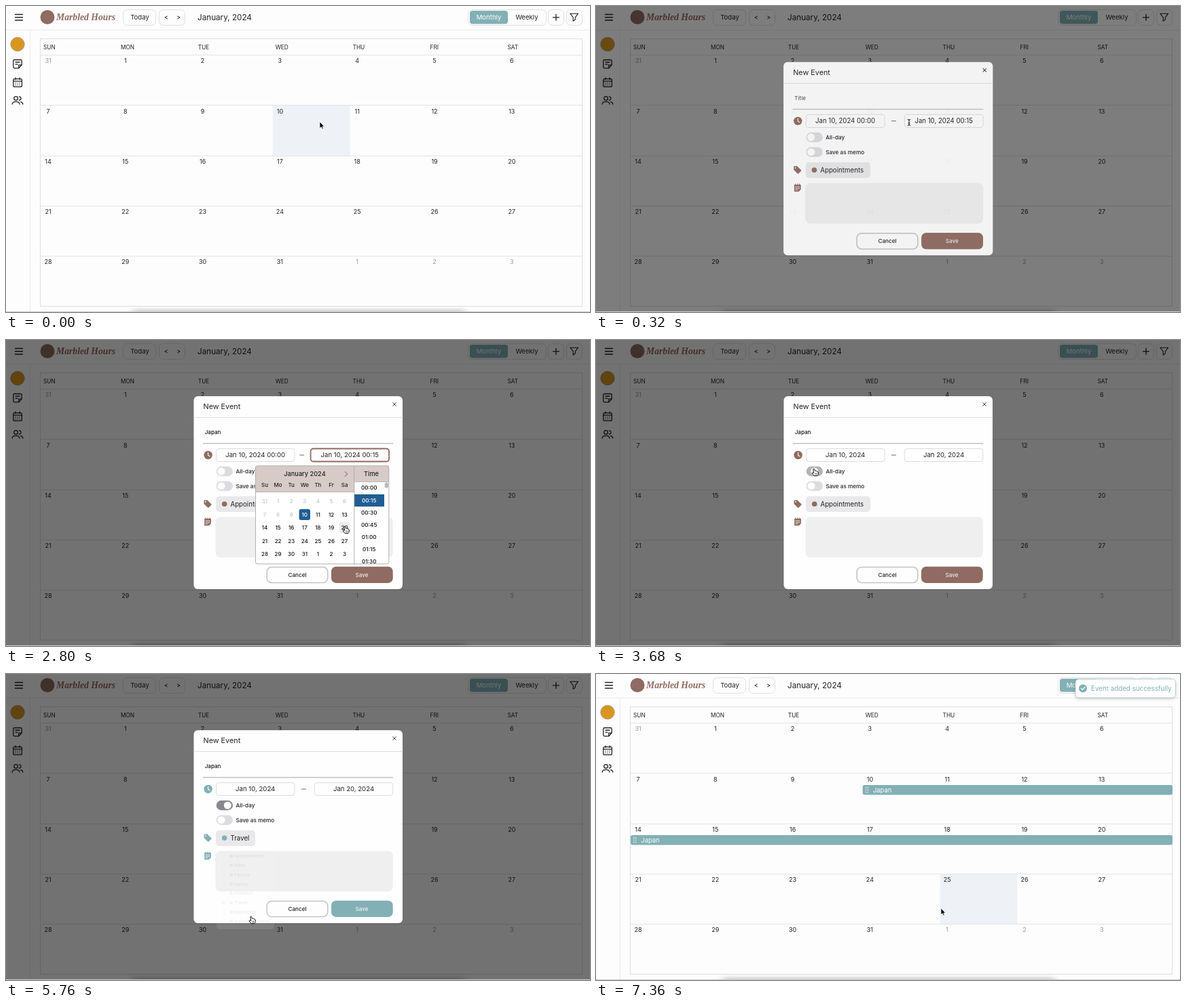
An HTML page that plays this animation: 860 px wide and 452 px high, repeating every 7440 ms.

```html
<!DOCTYPE html>
<html lang="en">
<head>
<meta charset="utf-8">
<title>Calendar event demo</title>
<style>
  html, body { margin: 0; width: 100%; height: 100%; overflow: hidden; background: #fdfdfd; }
  svg { display: block; width: 860px; height: 452px; font-family: Inter, "Open Sans", sans-serif; }
  text { white-space: pre; }
</style>
</head>
<body>
<svg id="stage" viewBox="0 0 860 452"></svg>
<script>
const LOOP = 7440, STEP = 80;
const TEAL = '#82b0b5', BROWN = '#8f6b62', INK = '#222', BLUE = '#1f5d93';
const DIM = .55;

// ---------- markup helpers ----------
const rect = (x, y, w, h, r, fill, extra = '') =>
  `<rect x="${x}" y="${y}" width="${w}" height="${h}" rx="${r}" fill="${fill}" ${extra}/>`;
const frame = (x, y, w, h, r, stroke, width = 1, extra = '') =>
  rect(x, y, w, h, r, 'none', `stroke="${stroke}" stroke-width="${width}" ${extra}`);
const dot = (x, y, r, fill, extra = '') => `<circle cx="${x}" cy="${y}" r="${r}" fill="${fill}" ${extra}/>`;
const path = (d, stroke, width = 1, extra = '') =>
  `<path d="${d}" fill="none" stroke="${stroke}" stroke-width="${width}" stroke-linecap="round" stroke-linejoin="round" ${extra}/>`;
// y is the vertical middle of the capitals
const text = (x, y, str, size, { fill = INK, mid = false, weight = 400, extra = '' } = {}) =>
  `<text x="${x}" y="${(y + size * 0.36).toFixed(2)}" font-size="${size}" fill="${fill}" font-weight="${weight}" ${mid ? 'text-anchor="middle"' : ''} ${extra}>${str}</text>`;
const group = (id, body, extra = '') => `<g id="${id}" ${extra}>${body}</g>`;
const range = n => [...Array(n).keys()];

// ---------- calendar page ----------
const colX = i => 51 + i * 113.9;
const rowY = i => Math.round(72 + i * 74.3) + .5;

function cells() {
  const names = ['SUN', 'MON', 'TUE', 'WED', 'THU', 'FRI', 'SAT'];
  const days = range(35).map(i => {
    const inMonth = i > 0 && i < 32;
    return text(62 + (i % 7) * 113.8, 81.2 + Math.floor(i / 7) * 74.25, (i + 30) % 31 + 1, 9,
      { mid: true, fill: inMonth ? INK : '#999' });
  });
  const lines = range(5).map(i => path(`M51 ${rowY(i)}H848`, '#e4e4e4'));
  return names.map((n, i) => text(55 + i * 113.9, 61, n, 8.3)).join('') +
    lines.join('') + frame(50.5, 48.5, 798, 395, 0, '#dedede') + days.join('');
}

function topBar() {
  const btn = (x, w) => frame(x + .5, 5.5, w, 23, 6, '#e0e0e0');
  return path('M0 35.5H860M35.5 36V452', '#ececec') +
    path('M13.5 12.5H24.5M13.5 16.8H24.5M13.5 21H24.5', INK, 1.4) +
    dot(61, 16.5, 10.5, BROWN) +
    `<text x="74" y="21" font-family="'Liberation Serif', serif" font-style="italic" font-weight="700" font-size="13.7" fill="${BROWN}">Marbled Hours</text>` +
    btn(172, 48) + text(197, 17, 'Today', 9.6, { mid: true }) +
    btn(225, 38) + path('M237.4 15.1L233.9 16.9L237.4 18.7M252.7 15.1L256.2 16.9L252.7 18.7', INK, 1) +
    text(282, 17, 'January, 2024', 11.7) +
    btn(680, 115) + rect(683, 7, 56, 19.5, 4, TEAL) +
    text(711, 17, 'Monthly', 9.6, { mid: true, fill: '#fff' }) +
    text(767, 17, 'Weekly', 9.6, { mid: true }) +
    btn(798, 23) + path('M805.5 16.8H814.5M810 12.3V21.3', INK, 1.3) +
    btn(825, 23) + path('M830.8 11.2H842.6L838.3 16.8V20L835.2 22.2V16.8Z', INK, 1.1);
}

function sideBar() {
  return dot(17, 56.5, 10.2, '#d9961f', 'stroke="#a89a80" stroke-width="1"') +
    path('M12.5 79.5H21.5Q23.2 79.5 23.2 81.2V87L18.8 91.8H12.5Q10.8 91.8 10.8 90V81.2Q10.8 79.5 12.5 79.5ZM23 87.2H18.8V91.5M14 83H20M14 86.2H17', INK, 1.3) +
    frame(10.8, 107.6, 12.6, 11.8, 2, INK, 1.3) +
    path('M11 111.2H23.2M14 106V108.5M20.2 106V108.5', INK, 1.3) +
    path('M14 114H14.1M17 114H17.1M20 114H20.1M14 116.7H14.1M17 116.7H17.1M20 116.7H20.1', INK, 1.3) +
    dot(14.6, 136.4, 2.8, 'none', `stroke="${INK}" stroke-width="1.3"`) +
    path('M9.2 145Q9.4 141.3 14.6 141.3Q19.8 141.3 20 145M19.4 133.8Q22 134 22 136.4Q22 138.8 19.4 139M21.6 141.6Q24.7 142.4 24.8 145', INK, 1.3);
}

function eventBar(col, y) {
  const x = colX(col);
  const grip = range(6).map(i => dot(x + 4.7 + (i % 2) * 3, y + 3.9 + (i >> 1) * 3.3, .8, '#fff')).join('');
  return rect(x, y, 849 - x, 14.5, 3, TEAL) + grip + text(x + 15.3, y + 7.4, 'Japan', 9.4, { fill: '#fff' });
}

// ---------- dialog ----------
const field = (id, x) => group(id, rect(x, 160.5, 115.5, 19, 4, '#fff0', 'stroke="#dcdcdc"') +
  text(x + 57.7, 170, '', 9.6, { mid: true }));
const toggle = (id, y) => rect(309.7, y - 7.2, 24.3, 14.4, 7.2, '#dcdce0', `id="${id}Track"`) +
  dot(317, y, 5.5, '#fff', `id="${id}Knob"`);

function dialog() {
  const icon = 'fill="currentColor"';
  return rect(276.5, 83, 307.5, 285, 6, '#fefefe') +
    text(290.5, 98.5, 'New Event', 10.8) +
    path('M569.6 92.6L574.4 97.4M574.4 92.6L569.6 97.4', '#444', 1) +
    path('M277 114.5H584', '#dedede') +
    text(292.7, 136, '', 8.1, { extra: 'id="title"', weight: 500 }) +
    path('M290.5 152.7H569.5', '#c2c2c4', 1.5, 'stroke-linecap="butt"') +
    dot(297.6, 170, 6.2, 'currentColor') + path('M297.6 166.4V170.2L300 171.8', '#fff', 1.1) +
    field('start', 309.5) + group('dash', path('M435.5 170H441.5', '#555', .9)) + field('end', 454.3) +
    toggle('day', 194) + text(338.4, 194, 'All-day', 8.2, { weight: 500 }) +
    toggle('memo', 215.7) + text(338.4, 215.7, 'Save as memo', 8.2, { weight: 500 }) +
    `<path d="M291.5 237.5Q291.5 236.5 292.5 236.5H296.5L302.3 242.2Q303 243 302.3 243.8L298.6 247.5Q297.8 248.2 297 247.5L291.5 242Z" ${icon}/>` + dot(294, 239, .9, '#fff') +
    group('chip', rect(309, 230.7, 95, 23.3, 5, '#e9e9eb', 'id="chipBox"') +
      dot(321.7, 242.2, 3.8, 'currentColor') + text(330.5, 242.4, '', 9.7, { extra: 'id="chipText"' })) +
    `<path d="M292.2 264H302V271L298.8 274.2H292.2Z" ${icon}/>` +
    path('M294 262.8V264M297 262.8V264M300 262.8V264', 'currentColor', 1.2) +
    path('M294 267H300M294 269.3H300M294 271.6H297', '#fff', .8) +
    rect(308.5, 261.5, 261.3, 59.7, 7, '#efeff0') +
    text(316, 272, '', 8.2, { extra: 'id="note"' }) +
    frame(384.2, 335.4, 89.6, 23.2, 7, '#c2c2c2', 1.5) + text(429, 347, 'Cancel', 8.2, { mid: true, weight: 500 }) +
    rect(479, 334.7, 90.7, 24.2, 7, 'currentColor', 'id="saveBox"') +
    text(524, 347, 'Save', 8.2, { mid: true, fill: '#fff', extra: 'id="saveText"' }) +
    group('spinner', path('M511.5 343A4 4 0 0 1 515.5 347', '#fff', 1.2));
}

function picker() {
  const px = i => 381 + i * 19.6;
  const py = i => 238.3 + i * 19.55;
  const days = range(35).map(i => text(px(i % 7), py(Math.floor(i / 7)), (i + 30) % 31 + 1, 8,
    { mid: true, weight: 500, fill: i < 10 ? '#c4c4c4' : '#111', extra: `id="d${i}"` })).join('');
  const mark = (id, fill) => rect(0, 0, 16.4, 16.4, 3, fill, `id="${id}"`);
  const times = range(7).map(i => text(534.7, 218.5 + i * 18.1,
    `0${Math.floor(i / 4)}:${String(i % 4 * 15).padStart(2, '0')}`, 8.2, { mid: true, weight: 500, fill: i === 1 ? '#fff' : '#111' })).join('');
  return '<clipPath id="pickClip"><rect x="367" y="185" width="198" height="146" rx="3"/></clipPath>' +
    `<g clip-path="url(#pickClip)">` +
    rect(367.5, 186, 196.5, 145, 3, '#fff') + rect(367.5, 186, 145.5, 38.5, 0, '#d7cbc8') + rect(513, 186, 51, 23.5, 0, '#d7cbc8') +
    path('M367.5 224.5H513M513 209.5H564', '#aaa', .8) +
    text(440, 198, 'January 2024', 9.2, { mid: true, weight: 500 }) + text(538, 198, 'Time', 9.2, { mid: true, weight: 500 }) +
    path('M499.3 194.8L502.7 198L499.3 201.2', '#9a908d', 1.4) +
    ['Su', 'Mo', 'Tu', 'We', 'Th', 'Fr', 'Sa'].map((n, i) => text(px(i), 214.6, n, 8, { mid: true, weight: 500 })).join('') +
    mark('hoverDay', '#ececec') + mark('pickedDay', BLUE) + days +
    rect(513, 228, 44, 18, 0, BLUE) + times + rect(557.7, 210.5, 5.3, 8, 2.6, '#b9b9b9') + '</g>' +
    path('M512.8 186V331', '#aaa', .9) + frame(367.5, 185.8, 196.3, 145, 3, '#aaa', .9);
}

const TAGS = [['Appointments', BROWN], ['Work', '#7d8fb0'], ['Fitness', '#c98f6a'], ['Family', '#c58a9c'],
  ['Holidays', '#b3a06a'], ['Travel', TEAL], ['Education', '#8a7fa8'], ['Important Dates', '#b86b6b']];

function menu() {
  const rows = TAGS.map(([name, color], i) => {
    const y = 255 + 19 * (i + 1);
    return dot(324.5, y, 4, '#fff', 'stroke="#c4c4c8"') + dot(340, y, 3.5, color) + text(346, y, name, 9.4);
  }).join('');
  return rect(310, 255, 117, 168, 6, '#fff', 'filter="url(#lift)"') +
    rect(314, 0, 109, 18, 4, '#f0f0f1', 'id="menuHover"') + rows + dot(324.5, 274, 2.2, '#777', 'id="menuPick"');
}

const toast = () => rect(706, 7.5, 147.5, 27.5, 5, '#fff', `stroke="${TEAL}" stroke-opacity=".55" filter="url(#lift)"`) +
  dot(717, 21.2, 6, TEAL) + path('M714.3 21.4L716.3 23.3L719.8 19.5', '#fff', 1.3) +
  text(729, 21.4, 'Event added successfully', 9.8, { fill: TEAL });

const POINTERS = {
  arrow: `<path d="M0 0V9.6L2.2 7.6L3.7 10.8L5.2 10.1L3.8 7H6.6Z" fill="#000" stroke="#fff" stroke-width=".7"/>`,
  beam: path('M-1.8 -4.5Q0 -4.5 0 -3.3Q0 -4.5 1.8 -4.5M0 -3.5V3.5M-1.8 4.5Q0 4.5 0 3.3Q0 4.5 1.8 4.5M-1 1H1', '#111', 1),
  hand: `<path d="M-2.2 -4.4Q-1.2 -5.4 -.4 -4.2L.6 -1.6Q2 -2.4 2.6 -1.3Q4 -1.8 4.2 -.4Q5.4 -.4 5.3 1L4.8 4.2L3.8 5.6H-.8L-3.8 2Q-4.2 .7 -2.6 .9L-1.4 1.7Z" fill="#fff" stroke="#111" stroke-width="1" stroke-linejoin="round"/>` +
    path('M.9 1.7V4M2.5 1.7V4', '#111', .6)
};

document.getElementById('stage').innerHTML =
  `<defs><filter id="lift" x="-20%" y="-20%" width="140%" height="150%"><feDropShadow dx="0" dy="1.5" stdDeviation="2" flood-opacity=".2"/></filter>
   <filter id="soft" x="-10%" y="-200%" width="120%" height="500%"><feGaussianBlur stdDeviation="6 3.5"/></filter></defs>` +
  rect(0, 0, 860, 452, 0, '#fdfdfd') + rect(0, 0, 0, 0, 0, '#eef2f6', 'id="cell"') +
  cells() + topBar() + sideBar() +
  group('events', eventBar(3, 164) + eventBar(0, 238)) +
  rect(186, 450, 490, 8, 4, '#000', 'opacity=".3" filter="url(#soft)"') +
  rect(0, 0, 860, 451, 0, '#000', 'id="shade"') +
  group('dialog', dialog()) + group('picker', picker()) + group('menu', menu()) + group('toast', toast()) +
  rect(0, 451, 860, 1, 0, '#cfcfcf') +
  group('pointer', Object.entries(POINTERS).map(([k, v]) => group(k, v)).join(''));

// ---------- motion ----------
const $ = id => document.getElementById(id);
const set = (id, attrs) => { for (const k in attrs) $(id).setAttribute(k, attrs[k]); };
const show = (id, on) => set(id, { display: on ? 'inline' : 'none' });
const ramp = (t, from, span) => Math.min(1, Math.max(0, (t - from) / span));
const ease = p => p * p * (3 - 2 * p);
const typed = (str, t, times) => str.slice(0, times.filter(k => t >= k).length);
const around = (x, y, s) => `translate(${x} ${y}) scale(${s}) translate(${-x} ${-y})`;

// time, x, y, pointer shape from that time on
const TRACK = [
  [0, 462, 171, 'arrow'], [160, 461, 172, 'beam'], [400, 461, 172, 'beam'], [800, 350, 136, 'beam'],
  [1760, 350, 136, 'beam'], [2160, 505, 170, 'beam'], [2480, 505, 170, 'hand'], [2760, 500, 280, 'hand'],
  [3000, 500, 280, 'hand'], [3400, 322, 195, 'hand'], [3920, 322, 195, 'hand'], [4480, 359, 245, 'hand'],
  [4920, 359, 245, 'hand'], [5480, 362, 363, 'hand'], [5760, 362, 363, 'hand'], [6120, 400, 290, 'beam'],
  [6600, 400, 290, 'arrow'], [6880, 508, 346, 'hand'], [7040, 508, 346, 'arrow'], [LOOP, 508, 346, 'arrow']
];

function pointerAt(t) {
  const i = TRACK.findIndex(k => k[0] > t) - 1;
  const [t0, x0, y0, shape] = TRACK[i], [t1, x1, y1] = TRACK[i + 1];
  const p = ease(ramp(t, t0, t1 - t0));
  return { x: x0 + (x1 - x0) * p, y: y0 + (y1 - y0) * p, shape };
}

function markDay(id, i) {
  set(id, { x: 372.8 + (i % 7) * 19.6, y: 230.1 + Math.floor(i / 7) * 19.55 });
}

function render(t) {
  const cur = pointerAt(t);
  set('pointer', { transform: `translate(${cur.x} ${cur.y})` });
  for (const k in POINTERS) show(k, k === cur.shape);

  const hover = t < 80 ? [3, 1] : t >= 7280 ? [4, 3] : null;
  show('cell', hover);
  if (hover) set('cell', { x: colX(hover[0]), y: rowY(hover[1]), width: 113.9, height: 74.3 });

  const open = t < 4000 ? 1 - (1 - ramp(t, 40, 390)) ** 2 : 1 - ramp(t, 7104, 200);
  const shown = t < 80 ? 0 : open;
  set('shade', { opacity: shown * DIM });
  set('dialog', { opacity: shown, transform: around(430, 225.5, 1 + .03 * (1 - shown)) });

  const travel = t >= 5680, saving = t >= 7040;
  $('dialog').style.color = travel ? TEAL : BROWN;

  const name = typed('Japan', t, [960, 1040, 1200, 1360, 1520]);
  $('title').textContent = name || 'Title';
  set('title', { fill: name ? '#111' : '#444', 'font-weight': name ? 500 : 400 });

  // date range and its picker
  const allDay = t >= 3600, picked = t >= 2880, picking = t >= 2240 && t < 3440;
  $('start').lastChild.textContent = 'Jan 10, 2024' + (allDay ? '' : ' 00:00');
  $('end').lastChild.textContent = `Jan ${picked ? 20 : 10}, 2024` + (allDay ? '' : ' 00:15');
  set('end', { transform: `translate(${picking ? -5.7 : 0} 0)` });
  set('dash', { transform: `translate(${picking ? -2.7 : 0} 0)` });
  const box = $('end').firstChild;
  box.setAttribute('stroke', picking ? BROWN : '#dcdcdc');
  box.setAttribute('stroke-width', picking ? 1.8 : 1);
  show('picker', picking);
  const chosen = picked ? 20 : 10;
  markDay('pickedDay', chosen);
  [10, 20].forEach(i => set('d' + i, { fill: i === chosen ? '#fff' : '#111' }));
  const c = Math.round((cur.x - 381) / 19.6), r = Math.round((cur.y - 279) / 19.55) + 2;
  const overDay = c >= 0 && c < 7 && r >= 0 && r < 5;
  show('hoverDay', overDay);
  if (overDay) markDay('hoverDay', r * 7 + c);

  const on = ease(ramp(t, 3560, 240));
  set('dayKnob', { cx: 317 + 9.3 * on });
  const mix = (a, b) => Math.round(a + (b - a) * on);
  set('dayTrack', { fill: `rgb(${mix(220, 136)},${mix(220, 136)},${mix(224, 142)})` });

  // tag chip and menu
  const press = t >= 4640 && t < 4800;
  $('chipText').textContent = travel ? 'Travel' : 'Appointments';
  set('chipBox', { width: travel ? 58 : 95, fill: press ? '#e2e2e4' : '#e9e9eb' });
  set('chip', { transform: around(356.5, 242.3, press ? .97 : 1), opacity: press ? .75 : 1 });
  const leaving = t >= 5600;
  const m = leaving ? 1 - ramp(t, 5590, 186) : ramp(t, 4650, 400);
  show('menu', m > 0);
  set('menu', { opacity: m, transform: around(310, 255, leaving ? .7 + .3 * m : .8 + .2 * m) });
  const row = Math.round((cur.y - 255) / 19);
  show('menuHover', row > 0 && m === 1);
  set('menuHover', { y: 246 + 19 * row });
  set('menuPick', { cy: leaving ? 369 : 274 });

  $('note').textContent = typed('bring passport', t, range(14).map(i => 6310 + i * 24));

  // saving and result
  set('saveBox', { opacity: saving ? .68 : 1 });
  set('saveText', { x: saving ? 532.7 : 524 });
  show('spinner', saving);
  set('spinner', { transform: `rotate(${t * .45} 511.5 347)` });
  show('events', saving);
  const note = ramp(t, 7200, 160);
  set('toast', { opacity: note, transform: `translate(0 ${-12 * (1 - ease(note))})` });
}

const begin = performance.now();
function tick() {
  const t = (performance.now() - begin) % LOOP;
  render(Math.floor(t / STEP) * STEP);
  requestAnimationFrame(tick);
}
tick();
</script>
</body>
</html>
```
